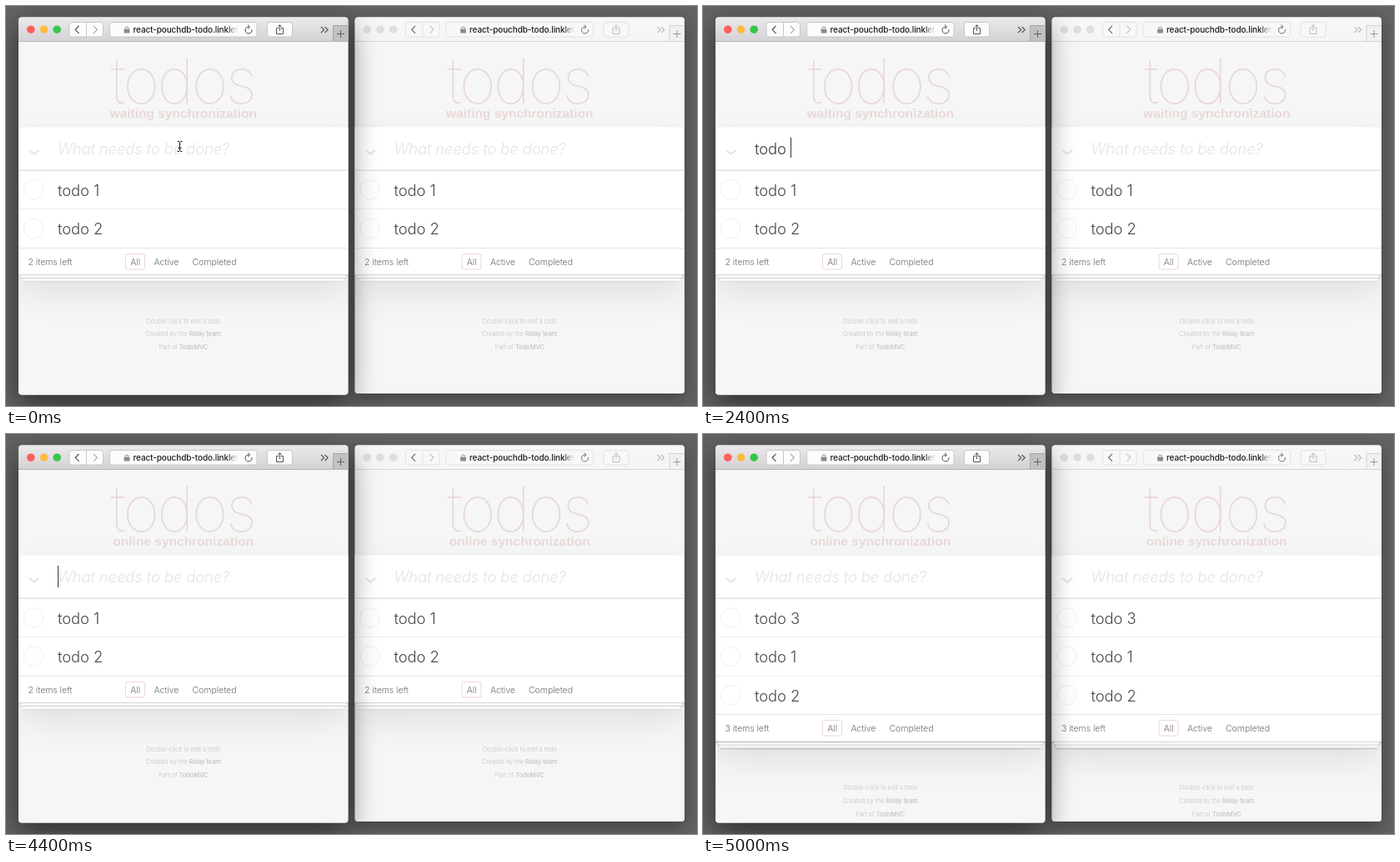
Recreate the animation shown at these times as an HTML page with a canvas. Size 829 by 480 pixels, loop 5100 ms.

```html
<!DOCTYPE html>
<html lang="en">
<head>
<meta charset="utf-8">
<title>Synchronized todos</title>
<style>
html, body { margin: 0; width: 100%; height: 100%; overflow: hidden; background: #5d5d5d; }
canvas { display: block; width: 829px; height: 480px; }
</style>
</head>
<body>
<canvas id="stage" width="829" height="480"></canvas>
<script>
const ctx = document.getElementById('stage').getContext('2d');
const LOOP = 5100, ROW = 46.4, WIDTH = 395.5;
const LIGHT = 'Inter, "Liberation Sans", sans-serif';
const BOLD = '"Liberation Sans", Arial, sans-serif';
const TINT = 'rgba(175,47,47,';

// [start ms, input text, caret visible]
const TYPING = [
  [0, '', false], [500, '', true], [1050, '', false],
  [1300, 't', true], [1500, 'to', true], [1600, 'tod', true], [1800, 'todo', true],
  [2050, 'todo ', true], [2500, 'todo 3', true], [3050, 'todo 3', false],
  [3200, '', true], [3650, '', false], [4100, '', true], [4650, '', false]
];
const ONLINE = 3300, LEFT_ADD = 4500, RIGHT_ADD = 4600, POINTER_END = 1300;

function text(str, x, y, font, color, spacing = 0, align = 'left') {
  ctx.font = font;
  ctx.fillStyle = color;
  ctx.textAlign = align;
  ctx.letterSpacing = spacing + 'px';
  ctx.fillText(str, x, y);
  return ctx.measureText(str).width;
}

function box(x, y, w, h, r, fill, stroke) {
  ctx.beginPath();
  ctx.roundRect(x, y, w, h, r);
  if (fill) { ctx.fillStyle = fill; ctx.fill(); }
  if (stroke) { ctx.strokeStyle = stroke; ctx.lineWidth = 1; ctx.stroke(); }
}

function line(color, width, ...pts) {
  ctx.beginPath();
  for (let i = 0; i < pts.length; i += 2) ctx.lineTo(pts[i], pts[i + 1]);
  ctx.strokeStyle = color;
  ctx.lineWidth = width;
  ctx.stroke();
}

function rect(x, y, w, h, fill) {
  ctx.fillStyle = fill;
  ctx.fillRect(x, y, w, h);
}

function disc(x, y, r, fill) {
  ctx.beginPath();
  ctx.arc(x, y, r, 0, 7);
  ctx.fillStyle = fill;
  ctx.fill();
}

function shadowed(alpha, blur, dy, draw) {
  ctx.save();
  ctx.shadowColor = `rgba(0,0,0,${alpha})`;
  ctx.shadowBlur = blur;
  ctx.shadowOffsetY = dy;
  draw();
  ctx.restore();
}

function toolbar(active) {
  const edge = active ? '#c9c7c9' : '#e2e2e2';
  const fill = active ? '#fcfcfc' : '#f8f8f8';
  const dark = active ? '#4c4c4c' : '#6a6a6a';
  const pale = active ? '#a9a9a9' : '#c4c4c4';
  const soft = active ? '#555' : '#bcbcbc';
  const bar = ctx.createLinearGradient(0, 13.5, 0, 43);
  bar.addColorStop(0, active ? '#ebe9eb' : '#f7f7f7');
  bar.addColorStop(1, active ? '#d3d1d3' : '#f5f5f5');
  rect(0, 13, WIDTH, 30, bar);
  rect(0, 42, WIDTH, 1, active ? '#b5b3b5' : '#d6d6d6');

  const lights = active ? ['#fc605b', '#fdbc40', '#34c84a'] : ['#dedede', '#dedede', '#dedede'];
  lights.forEach((c, i) => disc(14.8 + i * 15.7, 28.2, 4.8, c));

  box(61, 19.5, 40.5, 17.5, 3, fill, edge);
  line(edge, 1, 81.5, 20, 81.5, 37);
  line(dark, 1.2, 72.5, 23.8, 68.2, 28.3, 72.5, 32.8);
  line(pale, 1.2, 90, 23.8, 94.3, 28.3, 90, 32.8);

  box(109.5, 19.5, 176.5, 17.5, 3, fill, edge);
  box(126.6, 27.6, 6.8, 5, .6, '#8b8b8b');
  ctx.beginPath();
  ctx.arc(130, 27, 2, Math.PI, 0);
  ctx.strokeStyle = '#8b8b8b';
  ctx.lineWidth = 1;
  ctx.stroke();

  const fade = ctx.createLinearGradient(251, 0, 264, 0);
  fade.addColorStop(0, '#1c1c1c');
  fade.addColorStop(.45, 'rgba(28,28,28,.4)');
  fade.addColorStop(1, 'rgba(28,28,28,0)');
  ctx.save();
  ctx.beginPath();
  ctx.rect(0, 13, 263.5, 30);
  ctx.clip();
  text('react-pouchdb-todo.linklet.run', 137.5, 31.8, '500 10px Inter, sans-serif', fade, -.12);
  ctx.restore();

  ctx.beginPath();
  ctx.arc(276, 29, 3.9, -.25, 4.9);
  ctx.strokeStyle = dark;
  ctx.lineWidth = 1;
  ctx.stroke();
  line(dark, 1, 275, 22.6, 277.6, 25.1, 275, 27.4);

  box(298.5, 19.5, 30, 17.5, 3, fill, edge);
  line(soft, 1, 312, 26.5, 309.5, 26.5, 309.5, 33.5, 317.5, 33.5, 317.5, 26.5, 315, 26.5);
  line(soft, 1, 313.5, 30, 313.5, 22.8);
  line(soft, 1, 311.2, 25, 313.5, 22.7, 315.8, 25);

  for (const x of [363, 367.5]) line(soft, 1.1, x, 25, x + 3.7, 28.5, x, 32);
  rect(377, 23.5, 19, 18.5, active ? '#c2c0c2' : '#f1f1f1');
  line(active ? '#a9a7a9' : '#d5d5d5', 1, 377.5, 42, 377.5, 23.5, 396, 23.5);
  const plus = active ? '#626262' : '#9a9a9a';
  line(plus, 1, 382, 33.5, 391, 33.5);
  line(plus, 1, 386.5, 29, 386.5, 38);
}

function cardBase(bottom) {
  const paper = (inset, drop, alpha, blur, dy, fill) => shadowed(alpha, blur, dy, () =>
    rect(inset, 145.5, WIDTH - inset * 2, bottom + drop - 145.5, fill));
  paper(0, 0, .1, 40, 20, '#fff');
  paper(0, 0, .16, 3.2, 1.6, '#fff');
  paper(4.7, 7.9, .24, 1.6, .8, '#f8f8f8');
  paper(2.4, 4, .24, .9, .8, '#f8f8f8');
  paper(0, 0, .24, .9, .8, '#fff');
}

function credits(y) {
  const gray = '#c3c3c3', mid = WIDTH / 2;
  text('Double-click to edit a todo', mid, y, `300 7.5px ${LIGHT}`, gray, -.1, 'center');
  const pair = (plain, strong, py) => {
    const fonts = [`300 7.5px ${LIGHT}`, `500 7.5px ${LIGHT}`];
    ctx.letterSpacing = '-0.1px';
    const widths = [plain, strong].map((s, i) => {
      ctx.font = fonts[i];
      return ctx.measureText(s).width;
    });
    const x = mid - (widths[0] + widths[1]) / 2;
    text(plain, x, py, fonts[0], gray, -.1);
    text(strong, x + widths[0], py, fonts[1], gray, -.1);
  };
  pair('Created by the ', 'Relay team', y + 15.7);
  pair('Part of ', 'TodoMVC', y + 31.4);
}

function page(items, online, input, caret) {
  rect(0, 43, WIDTH, 430, '#f6f6f6');
  const mid = WIDTH / 2, bottom = 229.6 + items.length * ROW;
  text('todos', mid - 1, 117, `100 76px ${LIGHT}`, TINT + '.16)', -3, 'center');
  text((online ? 'online' : 'waiting') + ' synchronization', mid, 134.3,
    `bold 15.5px ${BOLD}`, TINT + '.15)', 0, 'center');

  cardBase(bottom);
  line('#e4e4e4', 2, 12.8, 173, 18.6, 177.6, 24.4, 173);
  const body = `300 18.4px ${LIGHT}`;
  if (input) text(input, 47, 178.3, body, '#3c3c3c', -.1);
  else text('What needs to be done?', 47, 178.3, `italic ${body}`, '#e3e3e3', -.1);
  if (caret) {
    ctx.font = body;
    ctx.letterSpacing = '-0.1px';
    const x = input ? 47.5 + ctx.measureText(input).width : 47;
    rect(Math.round(x), 158, 1, input ? 24 : 26, '#333');
  }
  rect(0, 196, WIDTH, 1, '#f1f1f1');
  rect(0, 197, WIDTH, 1, '#e2e2e2');

  items.forEach((name, i) => {
    const y = 197.4 + i * ROW;
    ctx.beginPath();
    ctx.arc(18, y + 23, 11.7, 0, 7);
    ctx.strokeStyle = '#ececec';
    ctx.lineWidth = .9;
    ctx.stroke();
    text(name, 47, y + 30.5, body, '#484848', -.1);
    rect(0, Math.round(y + ROW - .6), WIDTH, 1, i < items.length - 1 ? '#eee' : '#e5e5e5');
  });

  const y = bottom - 11.6, small = `300 10.6px ${LIGHT}`;
  text(`${items.length} items left`, 11.5, y, small, '#707070', -.1);
  text('All', 134.3, y, small, '#707070', -.1);
  text('Active', 162.5, y, small, '#707070', -.1);
  text('Completed', 208.5, y, small, '#707070', -.1);
  box(128.5, Math.round(y - 14) + .5, 23, 18.5, 2.4, null, TINT + '.2)');
  credits(bottom + 58.3);
}

function browser(x, height, active, state) {
  ctx.save();
  ctx.translate(x, 0);
  shadowed(active ? .55 : .35, active ? 34 : 20, active ? 11 : 6,
    () => box(0, 13.5, WIDTH, height, 4, '#f6f6f6'));
  ctx.beginPath();
  ctx.roundRect(0, 13.5, WIDTH, height, 4);
  ctx.clip();
  page(...state);
  toolbar(active);
  ctx.restore();
}

function pointer(x, y) {
  const beam = (color, w) => {
    line(color, w, x - 2.8, y - 6, x - 1, y - 6, x, y - 5, x, y + 5, x - 1, y + 6, x - 2.8, y + 6);
    line(color, w, x + 2.8, y - 6, x + 1, y - 6, x, y - 5, x, y + 5, x + 1, y + 6, x + 2.8, y + 6);
    line(color, w, x - 1.8, y + 2, x + 1.8, y + 2);
  };
  beam('#fff', 2.6);
  beam('#111', 1);
}

function draw(now) {
  const t = now % LOOP;
  const [, input, caret] = TYPING.findLast(step => t >= step[0]);
  const list = added => (t >= added ? ['todo 3'] : []).concat('todo 1', 'todo 2');
  const online = t >= ONLINE;
  rect(0, 0, 829, 480, '#636363');
  browser(418.5, 451.5, false, [list(RIGHT_ADD), online, '', false]);
  browser(15, 453, true, [list(LEFT_ADD), online, input, caret]);
  if (t < POINTER_END) pointer(208.5, 168.5);
}

const start = performance.now();
function tick() {
  draw(performance.now() - start);
  requestAnimationFrame(tick);
}
tick();
</script>
</body>
</html>
```
